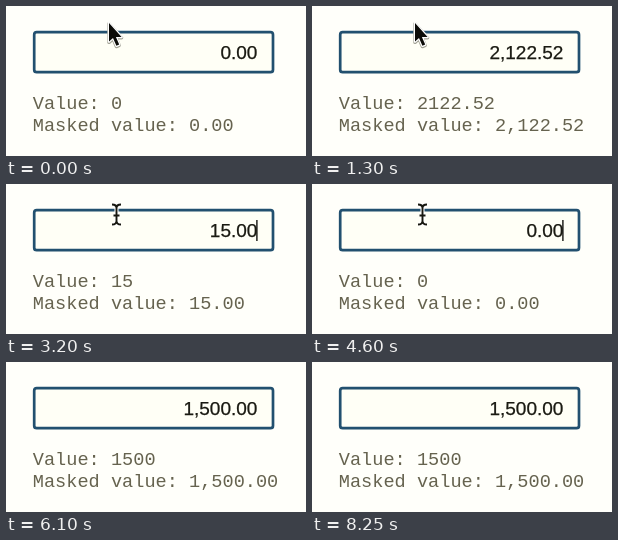
Write an HTML page that moves like this. It is 300 px wide and 150 px high and loops after 8300 ms.

```html
<!DOCTYPE html>
<html lang="en">
<head>
<meta charset="utf-8">
<title>Masked currency input</title>
<style>
  html, body { margin: 0; width: 100%; height: 100%; overflow: hidden; background: #fffffa; }
  svg { display: block; width: 300px; height: 150px; }
  .field { fill: #fffff6; stroke: #22506f; stroke-width: 2.7; }
  .amount { font: 19px "Liberation Sans", Arial, sans-serif; fill: #1a1a12; stroke: #1a1a12; stroke-width: .25; text-anchor: end; }
  .info { font: 18.6px "Liberation Mono", "Courier New", monospace; fill: #66634f; white-space: pre; }
  .shadow { fill: none; stroke: #a3a396; stroke-width: 3.4; stroke-linejoin: round; }
  .pointer { fill: #0c0c08; stroke: #fff; stroke-width: 2.4; stroke-linejoin: round; paint-order: stroke; }
  .halo { fill: none; stroke: #fff; stroke-width: 4; }
  .beam { fill: none; stroke: #17170f; stroke-width: 1.9; }
</style>
</head>
<body>
<svg viewBox="0 0 300 150">
  <defs>
    <path id="arrowShape" d="M103 17V35.6L107 31.9L110.4 39.8L113.2 38.6L109.9 31H115.6Z"/>
    <path id="beamShape" d="M106 20.5Q110.5 20.5 110.5 24V37Q110.5 40.5 106 40.5M115 20.5Q110.5 20.5 110.5 24M110.5 37Q110.5 40.5 115 40.5M107.5 31.5H113.5"/>
  </defs>
  <rect class="field" x="28.2" y="26.2" width="238.8" height="40" rx="2.5"/>
  <text class="amount" id="amount" x="251.4" y="53"></text>
  <rect id="caret" x="250.2" y="36" width="1.4" height="21" fill="#15150f"/>
  <text class="info" id="value" x="26.8" y="103"></text>
  <text class="info" id="masked" x="26.8" y="125"></text>
  <g id="arrow">
    <use class="shadow" href="#arrowShape" y="0.8"/>
    <use class="pointer" href="#arrowShape"/>
  </g>
  <g id="ibeam">
    <use class="halo" href="#beamShape"/>
    <use class="beam" href="#beamShape"/>
  </g>
</svg>
<script>
  const LOOP = 8300, BLINK = 500;
  const BEAM_IN = 2350, BEAM_OUT = 5600;

  // Bursts of typing; "<" is backspace
  const bursts = [
    { at: 280, gap: 100, keys: "212252" },
    { at: 1420, gap: 100, keys: "<<<<<<" },
    { at: 2500, gap: 200, keys: "150000" },
    { at: 3950, gap: 110, keys: "<<<<<<" },
    { at: 4850, gap: 140, keys: "150000" }
  ];
  const presses = bursts.flatMap(({ at, gap, keys }) =>
    [...keys].map((key, i) => ({ time: at + i * gap, key })));

  const $ = id => document.getElementById(id);
  const [amount, value, masked, caret, arrow, ibeam] =
    ["amount", "value", "masked", "caret", "arrow", "ibeam"].map($);
  const money = new Intl.NumberFormat("en-US", { minimumFractionDigits: 2 });

  const show = (el, on) => el.setAttribute("visibility", on ? "visible" : "hidden");

  function stateAt(t) {
    let cents = 0, last = -BLINK;
    for (const { time, key } of presses) {
      if (time > t) break;
      cents = key === "<" ? Math.floor(cents / 10) : cents * 10 + Number(key);
      last = time;
    }
    const caretOn = last >= 0 && (t - last) % (2 * BLINK) < BLINK;
    return { number: cents / 100, caretOn };
  }

  function draw(t) {
    const { number, caretOn } = stateAt(t);
    const text = money.format(number);
    amount.textContent = text;
    value.textContent = "Value: " + number;
    masked.textContent = "Masked value: " + text;
    show(caret, caretOn);
    show(arrow, t < BEAM_IN);
    show(ibeam, t >= BEAM_IN && t < BEAM_OUT);
  }

  const start = performance.now();
  function tick() {
    draw((performance.now() - start) % LOOP);
    requestAnimationFrame(tick);
  }
  tick();
</script>
</body>
</html>
```
